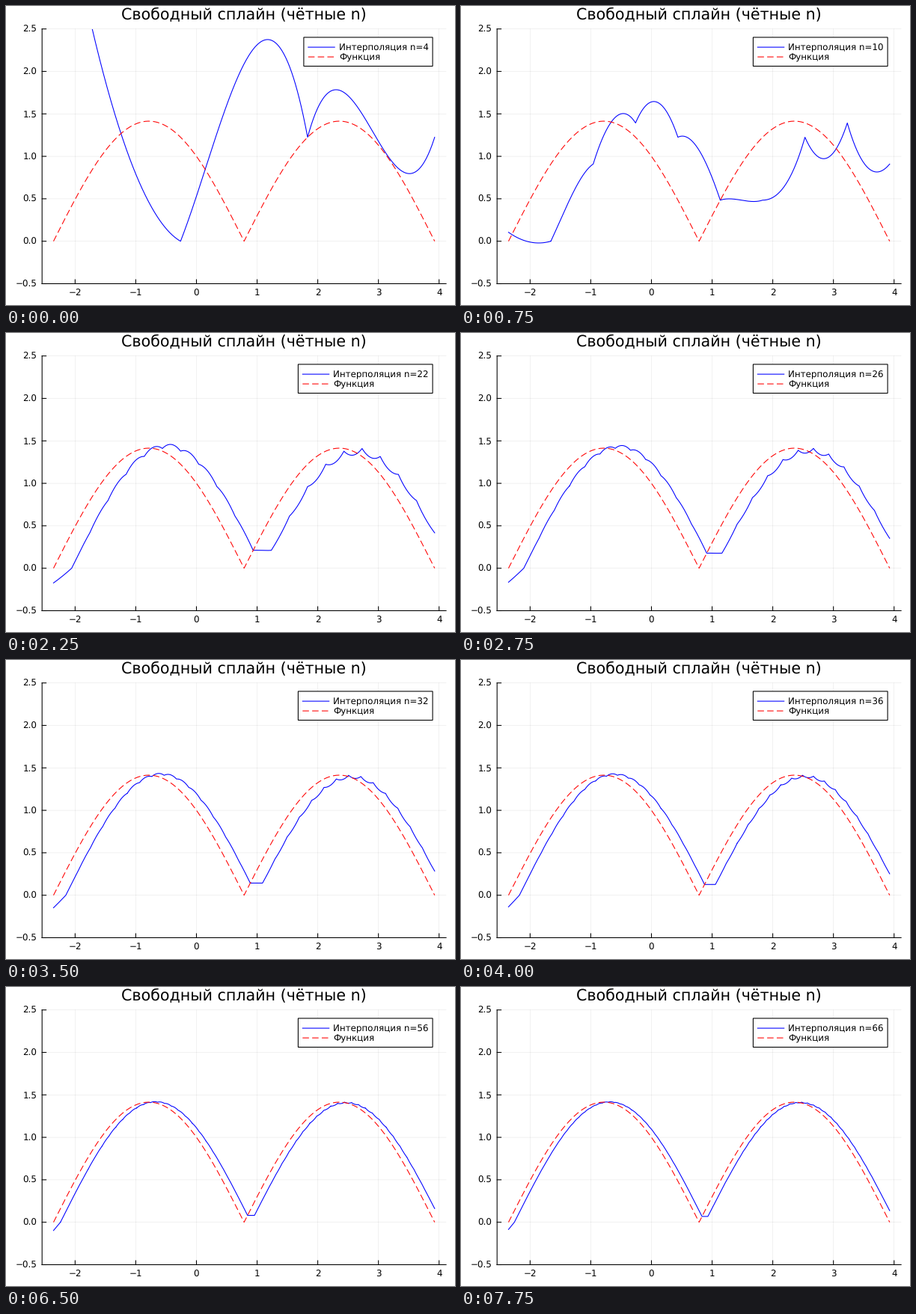
A matplotlib script that plays this animation: 600x400 px, repeating every 8000 ms.

```python
import matplotlib.pyplot as plt
import numpy as np
from matplotlib.animation import FuncAnimation
from matplotlib.patches import Rectangle

plt.rcParams["font.family"] = "DejaVu Sans"
plt.rcParams["text.hinting"] = "none"
plt.rcParams["lines.scale_dashes"] = False

W, H, DPI = 600, 400, 100
PT = 72 / DPI  # points per pixel
FRAMES, INTERVAL = 32, 250
LEFT, RIGHT, TOP, BOTTOM = 48.2, 588.1, 30.7, 371.5
A, B = -3 * np.pi / 4, 5 * np.pi / 4
PAD = 0.03 * (B - A)
Y_MIN, Y_MAX = -0.5, 2.5
DASH = (0, (8.55 * PT, 4.28 * PT))
SMALL, LARGE = 11.83, 20.7
LINE_W = 1.07


def px(x):
    return LEFT + (x - A + PAD) / (B - A + 2 * PAD) * (RIGHT - LEFT)


def py(y):
    return BOTTOM - (y - Y_MIN) / (Y_MAX - Y_MIN) * (BOTTOM - TOP)


def wave(x):
    return np.cos(x) - np.sin(x)


def spline(n):
    """Cubic pieces whose values lag one node behind the function."""
    nodes = np.linspace(A, B, n)
    h = nodes[1] - nodes[0]
    m = n - 1
    g = wave(nodes)
    a = np.abs(g[:m])
    rhs = np.zeros(m)
    rhs[1:] = 12 * (g[2:] - 2 * g[1:-1] + g[:-2]) / h**2
    c = np.linalg.solve(4 * np.eye(m) + np.eye(m, k=1) + np.eye(m, k=-1), rhs)

    b, d = np.empty(m), np.zeros(m)
    b[0] = 1 + 2 / 3 * A * c[0]
    b[1:] = np.diff(a) / h + h * (2 * c[1:] + c[:-1]) / 3
    d[1:] = np.diff(c) / (3 * h)

    t = np.linspace(-h, 0, max(8, 600 // m))
    x = nodes[1:, None] + t
    y = a[:, None] + b[:, None] * t + c[:, None] * t**2 + d[:, None] * t**3
    return x.ravel(), y.ravel()


fig = plt.figure(figsize=(W / DPI, H / DPI), dpi=DPI, facecolor="white")
ax = fig.add_axes([0, 0, 1, 1])
ax.set_xlim(0, W)
ax.set_ylim(H, 0)
ax.axis("off")


def line(xs, ys, color="black", width=LINE_W, **kw):
    return ax.plot(xs, ys, color=color, lw=width * PT, snap=False, **kw)[0]


def grid(xs, ys):
    line(xs, ys, width=LINE_W / 2, alpha=0.1, zorder=1)


def label(x, y, s, size=SMALL, ha="left", **kw):
    return ax.text(x, y, s, fontsize=size * PT, ha=ha, va="baseline", **kw)


def minus(s):
    return s.replace("-", "\u2212")


# Grid, ticks and axis labels
for v in range(-2, 5):
    x = px(v)
    grid([x, x], [TOP, BOTTOM])
    line([x, x], [BOTTOM, BOTTOM - 5.4], zorder=2)
    label(x, 387.4, minus(str(v)), ha="center")
for v in np.arange(Y_MIN, Y_MAX + 0.1, 0.5):
    y = py(v)
    grid([LEFT, RIGHT], [y, y])
    line([LEFT, LEFT + 5.4], [y, y], zorder=2)
    label(41.4, y + 4.3, minus(f"{v:.1f}"), ha="right")
line([LEFT, LEFT], [TOP, BOTTOM], zorder=2)
line([LEFT, RIGHT], [BOTTOM, BOTTOM], zorder=2)
label((LEFT + RIGHT) / 2, 18.4, "Свободный сплайн (чётные n)", LARGE, "center")

# Curves
plot_area = Rectangle((LEFT, TOP), RIGHT - LEFT, BOTTOM - TOP,
                      transform=ax.transData)
curve = line([], [], "blue", zorder=3)
curve.set_clip_path(plot_area)
xs = np.linspace(A, B, 601)
line(px(xs), py(np.abs(wave(xs))), "red", zorder=4,
     linestyle=DASH, dash_capstyle="butt")

# Legend
BOX_RIGHT, BOX_TOP, BOX_BOTTOM = 570.1, 41.9, 80.5
box = Rectangle((0, BOX_TOP), 1, BOX_BOTTOM - BOX_TOP, facecolor="white",
                edgecolor="black", lw=LINE_W * PT, snap=False, zorder=5)
ax.add_patch(box)
key_fit = line([], [], "blue", zorder=6)
key_fun = line([], [], "red", zorder=6, linestyle=DASH, dash_capstyle="butt")
text_fit = label(0, 59.5, "", zorder=6)
text_fun = label(0, 72.5, "Функция", zorder=6)


def update(i):
    n = 4 + 2 * i
    x, y = spline(n)
    curve.set_data(px(x), py(y))

    left = BOX_RIGHT - (172.2 if n < 10 else 179.7)
    box.set_x(left)
    box.set_width(BOX_RIGHT - left)
    key = [left + 5.9, left + 41.3]
    key_fit.set_data(key, [55.1, 55.1])
    key_fun.set_data(key, [68.1, 68.1])
    text_fit.set_x(left + 46.9)
    text_fun.set_x(left + 46.9)
    text_fit.set_text(f"Интерполяция n={n}")
    return curve, box, key_fit, key_fun, text_fit, text_fun


anim = FuncAnimation(fig, update, frames=FRAMES, interval=INTERVAL,
                     repeat=True, repeat_delay=0, blit=False)
plt.show()
```
